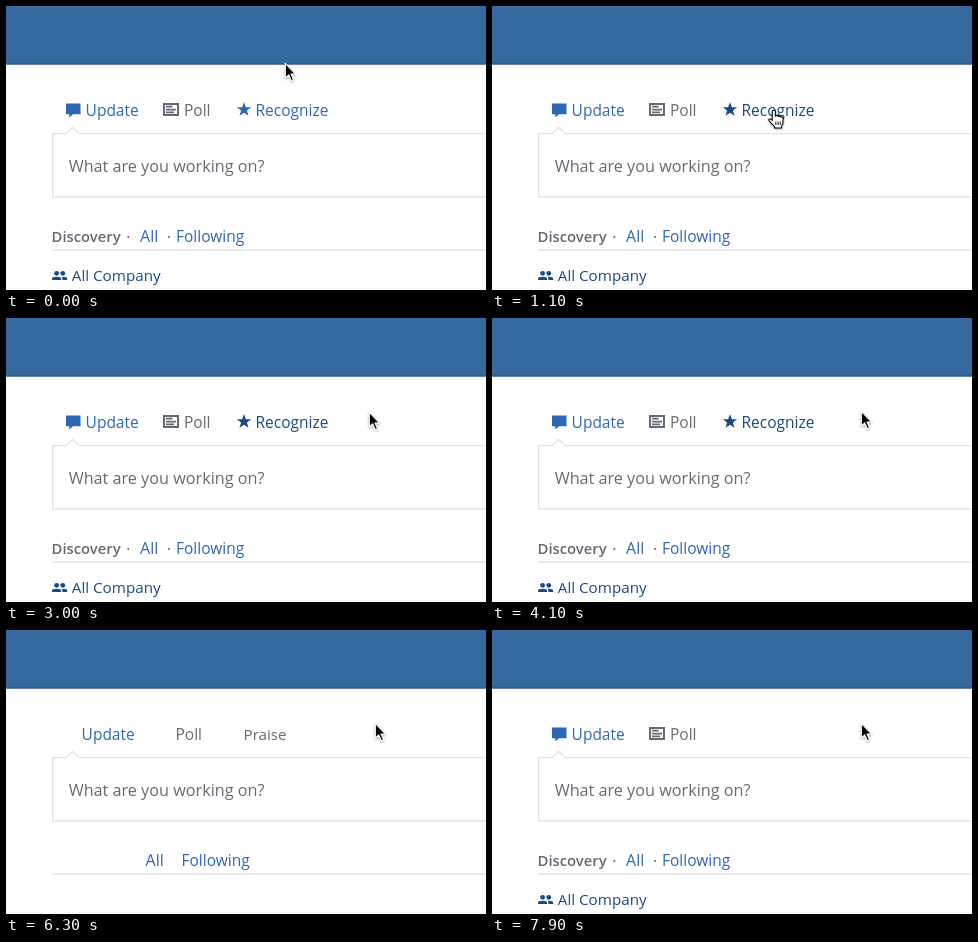
Recreate the animation shown at these times as an HTML page. Size 480 px wide and 284 px high, loop 8000 ms.

```html
<!DOCTYPE html>
<html lang="en">
<head>
<meta charset="utf-8">
<title>Post composer reload</title>
<style>
  html, body { margin: 0; width: 100%; height: 100%; overflow: hidden; background: #fff; }
  svg { display: block; width: 480px; height: 284px; }
  text { font: 15.5px "Open Sans", "Noto Sans", sans-serif; fill: var(--c, #2d67b6); }
  .blue { --c: #2d67b6; }
  .navy { --c: #184a87; }
  .grey { --c: #646a75; }
  .icon { fill: var(--c); }
  .line { fill: none; stroke: #e1e2e4; stroke-width: 1.3; }

  .page, .ready, .loading, .company, .star, .arrow, .hand { animation: 8s step-end infinite; }
  .page { animation-name: page; }
  .ready { animation-name: ready; }
  .loading { animation-name: loading; }
  .company { animation-name: company; }
  .star { animation-name: star; }
  .arrow { animation-name: arrow; }
  .hand { animation-name: hand; }
  .cursor { animation: move 8s infinite; }

  @keyframes page { 0%, 78.75% { opacity: 1; } 57.5% { opacity: 0; } }
  @keyframes ready { 0%, 80% { opacity: 1; } 57.5% { opacity: 0; } }
  @keyframes loading { 0%, 80% { opacity: 0; } 78.75% { opacity: 1; } }
  @keyframes company { 0%, 86.25% { opacity: 1; } 57.5% { opacity: 0; } }
  @keyframes star {
    0% { --c: #2d67b6; opacity: 1; }
    8.75% { --c: #184a87; opacity: 1; }
    57.5%, 100% { --c: #184a87; opacity: 0; }
  }
  @keyframes arrow { 0%, 35% { opacity: 1; } 8.75% { opacity: 0; } }
  @keyframes hand { 0%, 35% { opacity: 0; } 8.75% { opacity: 1; } }
  @keyframes move {
    0%, 0.6% { transform: translate(279px, 57px); animation-timing-function: ease-in-out; }
    11.25%, 13.75% { transform: translate(282px, 104px); animation-timing-function: ease-out; }
    17.5%, 32.3% { transform: translate(288px, 104px); animation-timing-function: ease-in-out; }
    38.75%, 100% { transform: translate(369px, 93px); }
  }
</style>
</head>
<body>
<svg viewBox="0 0 480 284">
  <rect width="480" height="284" fill="#fff"/>
  <rect width="480" height="58" fill="#ecedf3"/>

  <g class="page">
    <rect width="480" height="58.5" fill="#36699e"/>
    <rect y="57.3" width="480" height="1.2" fill="#2a5685"/>
    <path class="line" d="M482 191H46.7V127.7H60L66.7 121.5L73.5 127.7H482M46 244H480"/>
    <text class="grey" x="62.7" y="165.5" style="font-size:16.2px">What are you working on?</text>
  </g>

  <g class="ready">
    <g class="blue">
      <path class="icon" d="M60 97.5H74.5V108.3H67L63.3 111.6V108.3H60Z"/>
      <text x="79.6" y="109.5">Update</text>
      <text x="134" y="235.5" style="font-size:16px">All</text>
      <text x="170" y="235.5">Following</text>
    </g>
    <g class="grey">
      <path class="icon" fill-rule="evenodd" d="M157 97H173V110H157ZM159 99V108H171V99Z"/>
      <path class="icon" d="M160 99.8H166.5V101.5H160ZM160 102.7H170V104.4H160ZM160 105.6H168V107.3H160Z"/>
      <text x="178" y="109.5">Poll</text>
      <text x="45.6" y="235.5" style="font-size:14.8px;font-weight:600">Discovery</text>
      <circle class="icon" cx="122.3" cy="231" r="1.1"/>
      <circle class="icon" cx="163" cy="231" r="1.1"/>
    </g>
  </g>

  <g class="star">
    <path class="icon" d="M238 96L239.8 101.2L245.2 101.3L240.9 104.6L242.5 109.8L238 106.7L233.5 109.8L235.1 104.6L230.8 101.3L236.2 101.2Z"/>
    <text x="249.5" y="109.5">Recognize</text>
  </g>

  <g class="company navy">
    <circle class="icon" cx="50.6" cy="267.3" r="2.4"/>
    <circle class="icon" cx="56.8" cy="267.3" r="2.4"/>
    <path class="icon" d="M46 274V272.6Q46 270.7 50.6 270.7T55.2 272.6V274ZM56.4 274V272.4Q56.4 271.4 55.6 270.8Q61.2 270.5 61.2 272.6V274Z"/>
    <text x="65.8" y="275" style="font-size:15.2px">All Company</text>
  </g>

  <g class="loading blue">
    <text x="75.6" y="109.5">Update</text>
    <g class="grey">
      <text x="169.5" y="109.5">Poll</text>
      <text x="237.5" y="109.5" style="font-size:15.2px">Praise</text>
    </g>
    <text x="139.5" y="235.5" style="font-size:16px">All</text>
    <text x="175.5" y="235.5">Following</text>
  </g>

  <g class="cursor" style="filter:drop-shadow(0 1px 1px #0005)">
    <path class="arrow" fill="#000" stroke="#fff" stroke-width="1.2" stroke-linejoin="round"
      d="M.3 .3V15.2L3.7 12L6.2 17.8L8.6 16.8L6.1 11.1H10.7Z"/>
    <g class="hand" fill="#fff" stroke="#000" stroke-width="1.1" stroke-linejoin="round">
      <path d="M-1.8 9.5V1.8A1.6 1.6 0 0 1 1.4 1.8V6.2A1.5 1.5 0 0 1 4.2 6.6A1.5 1.5 0 0 1 6.8 7.2A1.4 1.4 0 0 1 9 8.3V12.3Q9 14.3 7.6 16V18H.6V16.6Q-2.6 14-4.9 10.8C-6 9-4 8-1.8 10.5Z"/>
      <path d="M1.8 11.5V15M4 11.5V15M6.2 11.5V15" stroke-width=".9"/>
    </g>
  </g>
</svg>
</body>
</html>
```
